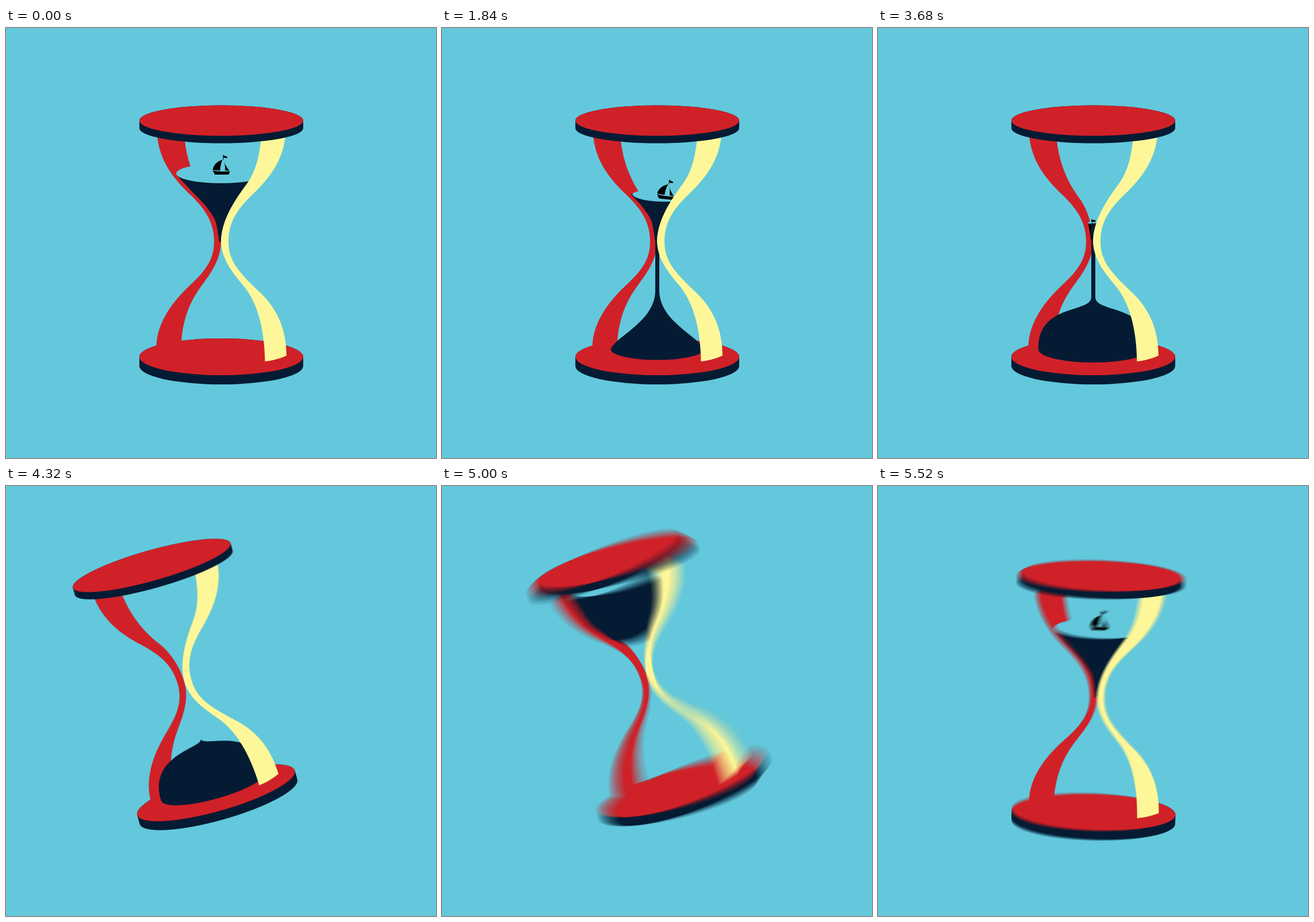
Animation of 748x748 px, one loop 5.56 s. Source, as an HTML page with a canvas:

```html
<!DOCTYPE html>
<html lang="en">
<head>
<meta charset="utf-8">
<title>Hourglass</title>
<style>
  html, body { margin: 0; width: 100%; height: 100%; overflow: hidden; background: #63c8dc; }
  canvas { display: block; width: 748px; height: 748px; }
</style>
</head>
<body>
<canvas id="stage" width="748" height="748"></canvas>
<script>
const SIZE = 748, LOOP = 5560, STEP = 40;
const SKY = '#63c8dc', RED = '#d02128', NAVY = '#041b33', YELLOW = '#fdf799';
const CENTER_X = 374.5, CENTER_Y = 366, FOOT_X = 142.5, FOOT_Y = 586;
const TILT_START = 3920, FLIP_START = 4676, LANDING = 5100;
const SHUTTER = 32, SAMPLES = 16;

const stage = document.getElementById('stage').getContext('2d');
const layer = document.createElement('canvas');
layer.width = layer.height = SIZE;
const ctx = layer.getContext('2d');

// Monotone cubic interpolation through [position, value] pairs
function at(keys, x) {
  const last = keys.length - 1;
  if (x <= keys[0][0]) return keys[0][1];
  if (x >= keys[last][0]) return keys[last][1];
  const i = keys.findIndex(k => k[0] > x) - 1;
  const secant = j => (keys[j + 1][1] - keys[j][1]) / (keys[j + 1][0] - keys[j][0]);
  const slope = j => {
    if (j === 0) return secant(0);
    if (j === last) return secant(last - 1);
    const a = secant(j - 1), b = secant(j);
    return a * b > 0 ? 2 * a * b / (a + b) : 0;
  };
  const h = keys[i + 1][0] - keys[i][0], u = (x - keys[i][0]) / h, v = 1 - u;
  return keys[i][1] * (1 + 2 * u) * v * v + slope(i) * h * u * v * v
       + keys[i + 1][1] * u * u * (3 - 2 * u) - slope(i + 1) * h * u * u * v;
}

// All shapes use x measured from the glass axis
const redGlass = new Path2D(`M-111.5 180 L-111.5 188 C-107 230 -85 260 -57 287 C-30 313 -12.5 335 -12.5 372
  C-12.5 405 -30 425 -57 450 C-85 477 -108 508 -112.5 546 L-113 556 L-70 556 L-69.5 546
  C-66 500 -52 472 -32 445 C-17 425 -1 402 -.5 372 C-.5 345 -10 315 -25 295 C-45 268 -59 235 -63.5 196 L-65 180Z`);
const yellowGlass = new Path2D(`M70 180 L69.5 190 C66 225 60 252 40 277 C16 310 0 340 -.5 372
  C1 405 22 428 40 450 C62 478 75 520 76 580 Q95 578 113.5 570 C113 520 95 484 62 455
  C35 428 12.5 408 12.5 372 C12.5 335 30 313 57 287 C85 260 107 230 111.5 188 L112 180Z`);
const boat = new Path2D(`M-15 -7 Q0 -4 15 -6 L13 0 L-11 0Z
  M2 -26 Q-13 -21 -15 -8 L-2 -7 Q-2 -16 2 -26Z M4 -26 Q6 -16 14 -7 L7 -7 Q7 -17 4 -26Z
  M3 -34 L4 -34 L4 -26 L3 -26Z M4 -34 Q7 -31 10 -32 L10 -29 Q7 -28 4 -30Z`);

const innerWidth = [[190, 105], [200, 100], [253, 78.5], [277, 58], [315, 23], [338, 9.5], [372, 3.5]];
const vessel = new Path2D();
for (let y = 190; y <= 372; y += 2) vessel.lineTo(-at(innerWidth, y), y);
for (let y = 372; y >= 190; y -= 2) vessel.lineTo(at(innerWidth, y), y);
vessel.closePath();

const motion = {
  angle: [[TILT_START, 0], [4280, -16], [FLIP_START, 0], [4740, 20], [4880, 92], [5000, 162.5],
          [LANDING, 180], [5280, 200], [5520, 181.8], [LOOP, 180]],
  flyX: [[FLIP_START, 0], [4860, 12], [5000, -19], [LANDING, 0]],
  flyY: [[FLIP_START, 0], [4740, -26], [4880, -58], [5000, -39], [LANDING, 0]],
  level: [[0, 253], [1040, 270], [2600, 315], [3680, 338], [3900, 372]],
  refill: [[4840, 176], [5000, 189], [5300, 253]],
  refillDepth: [[4840, 256], [5000, 304], [LANDING, 372], [5200, 800]],
  refillSpread: [[5000, 0.87], [5200, 1]],
  boatX: [[0, 0], [1040, 22], [2600, 4], [3680, 0]],
  boatY: [[0, 255], [1040, 268], [2600, 332], [3680, 367], [3900, 410]],
  streamTop: [[3860, 371], [3990, 474]],
  streamEnd: [[0, 372], [300, 562]]
};
// Pile outline: base radius, base depth, two control points and the peak
const pile = {
  radius: [[280, 4], [1040, 50.5], [2600, 95], [3680, 95.5]],
  depth: [[280, 3], [1040, 13], [2600, 23]],
  sideX: [[280, 4], [1040, 38], [2600, 95], [3680, 97]],
  sideY: [[280, 555], [1040, 545], [2600, 528], [3680, 478]],
  neckY: [[280, 550], [1040, 520], [2600, 505], [3680, 497], [3980, 490]],
  peakY: [[280, 540], [1040, 470], [2600, 452], [3680, 468], [3980, 476]],
  tip: [[3860, 3.5], [3990, 0.5]]
};

const radians = deg => deg * Math.PI / 180;

function fill(color, path) {
  ctx.fillStyle = color;
  path ? ctx.fill(path) : ctx.fill();
}

function disc(y, ry, height) {
  ctx.beginPath();
  ctx.ellipse(0, y + height, FOOT_X, ry, 0, 0, Math.PI);
  ctx.ellipse(0, y, FOOT_X, ry, 0, Math.PI, 2 * Math.PI);
  fill(NAVY);
  ctx.beginPath();
  ctx.ellipse(0, y, FOOT_X, ry, 0, 0, 2 * Math.PI);
  fill(RED);
}

function drawPile(t) {
  if (t < 280) return;
  const p = {};
  for (const name in pile) p[name] = at(pile[name], t);
  ctx.beginPath();
  ctx.moveTo(-p.radius, 559);
  ctx.bezierCurveTo(-p.sideX, p.sideY, -3.5, p.neckY, -p.tip, p.peakY);
  ctx.lineTo(p.tip, p.peakY);
  ctx.bezierCurveTo(3.5, p.neckY, p.sideX, p.sideY, p.radius, 559);
  ctx.ellipse(0, 559, p.radius, p.depth, 0, 0, Math.PI);
  fill(NAVY);
}

function drawStream(t) {
  const top = at(motion.streamTop, t);
  const end = Math.min(at(motion.streamEnd, t), t > 280 ? at(pile.peakY, t) + 3 : SIZE);
  if (end > top && t < 3990) {
    ctx.fillStyle = NAVY;
    ctx.fillRect(-3.5, top, 7, end - top);
  }
}

function drawWater(level, tilt, depth = SIZE, spread = 1) {
  const width = at(innerWidth, level);
  ctx.save();
  ctx.scale(spread, 1);
  ctx.save();
  if (depth < SIZE) {
    ctx.beginPath();
    ctx.ellipse(0, level, 110, depth - level, 0, 0, Math.PI);
    ctx.clip();
  }
  ctx.clip(vessel);
  ctx.translate(0, level);
  ctx.rotate(tilt);
  ctx.fillStyle = NAVY;
  ctx.fillRect(-200, 0, 400, 300);
  ctx.restore();
  ctx.beginPath();
  ctx.ellipse(0, level, width, width * 0.218, tilt, 0, 2 * Math.PI);
  fill(SKY);
  ctx.restore();
}

function drawBoat(x, y, tilt) {
  ctx.save();
  ctx.clip(vessel);
  ctx.translate(x, y);
  ctx.rotate(tilt);
  fill('#000', boat);
  ctx.restore();
}

function pose(t, angle) {
  ctx.translate(CENTER_X, 0);
  const flying = t >= FLIP_START && t < LANDING;
  const pivotX = flying ? 0 : t < FLIP_START ? -FOOT_X : FOOT_X;
  const pivotY = flying ? CENTER_Y : FOOT_Y;
  if (flying) ctx.translate(at(motion.flyX, t), at(motion.flyY, t));
  ctx.translate(pivotX, pivotY);
  ctx.rotate(radians(angle));
  ctx.translate(-pivotX, -pivotY);
}

function drawScene(t) {
  const turn = at(motion.angle, t), flipped = turn > 90;
  ctx.fillStyle = SKY;
  ctx.fillRect(0, 0, SIZE, SIZE);
  ctx.save();
  pose(t, flipped ? turn - 180 : turn);
  disc(572, 32, 16);
  fill(RED, redGlass);
  if (flipped) {
    const level = at(motion.refill, t);
    drawWater(level, 0, at(motion.refillDepth, t), at(motion.refillSpread, t));
    if (t > LANDING) drawBoat(0, level + 2, 0);
  } else {
    drawPile(t);
    drawStream(t);
    if (t < 3900) {
      const tilt = radians(8) * Math.sin(2 * Math.PI * t / 1300);
      drawWater(at(motion.level, t), tilt);
      drawBoat(at(motion.boatX, t), at(motion.boatY, t), tilt * 1.6);
    }
  }
  fill(YELLOW, yellowGlass);
  disc(161, 26.5, 13);
  ctx.restore();
}

// The moving glass is averaged over the shutter time
function render(time) {
  const t = Math.floor(time % LOOP / STEP) * STEP;
  const count = t > TILT_START ? SAMPLES : 1;
  for (let i = 0; i < count; i++) {
    drawScene(t + ((i + 0.5) / count - 0.5) * SHUTTER);
    stage.globalAlpha = 1 / (i + 1);
    stage.drawImage(layer, 0, 0);
  }
}

const start = performance.now();
function tick() {
  render(performance.now() - start);
  requestAnimationFrame(tick);
}
tick();
</script>
</body>
</html>
```
